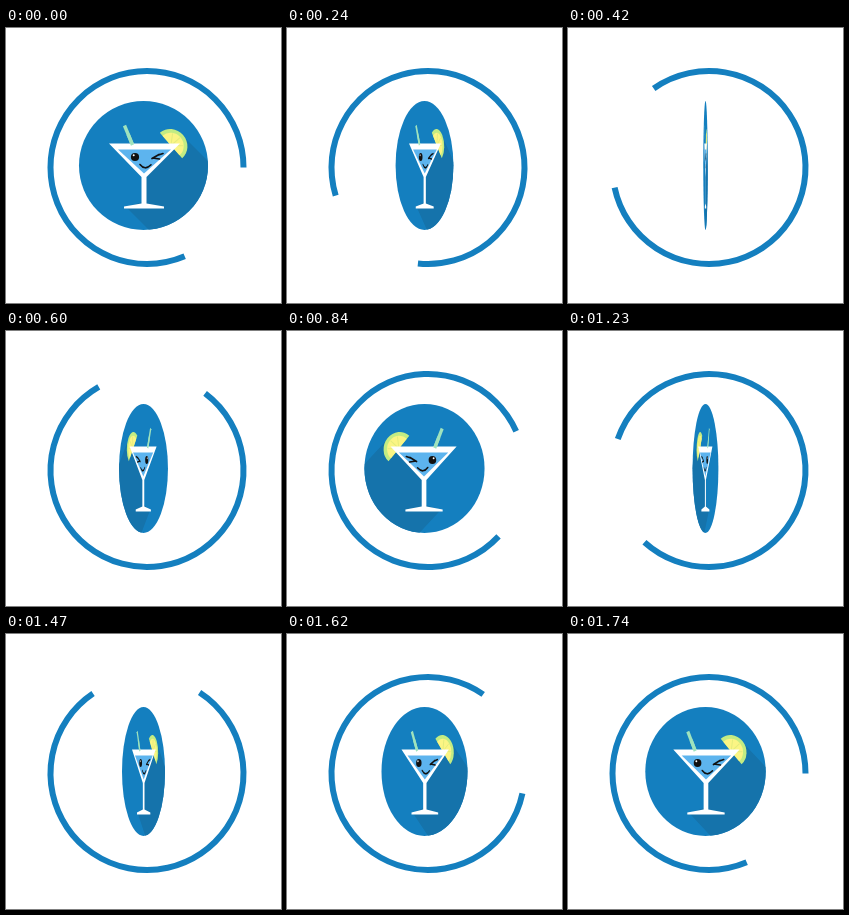
Write an HTML page that moves like this. It is 275 px wide and 275 px high and loops after 1.77 s.

```html
<!DOCTYPE html>
<html lang="en">
<head>
<meta charset="utf-8">
<title>Cocktail loader</title>
<style>
html, body { margin: 0; width: 100%; height: 100%; overflow: hidden; background: #fff; }
svg { display: block; width: 100vw; height: 100vh; }
</style>
</head>
<body>
<svg viewBox="0 0 275 275">
  <clipPath id="round"><circle cx="137.5" cy="137.5" r="64.5"/></clipPath>
  <!-- Arc runs from the end of the gap (67deg) round to 0deg -->
  <circle id="ring" cx="141" cy="139.5" r="96.5" fill="none" stroke="#147fbf" stroke-width="6"
    pathLength="360" stroke-dasharray="0 67 293 0"/>
  <g id="badge">
    <circle cx="137.5" cy="137.5" r="64.5" fill="#147fbf"/>
    <path clip-path="url(#round)" fill="#1573ab" d="M180 111L260 191 200 259 120 179 136 174 138 148 172 118Z"/>
    <path d="M118.5 97.5L127 118" stroke="#9fe3bd" stroke-width="3.4"/>
    <g transform="translate(165 117.5) rotate(49)">
      <path d="M-17 0A17 16 0 0 1 17 0Z" fill="#c3ec83"/>
      <path d="M-13 0A13 12.5 0 0 1 13 0Z" fill="#fbf584"/>
      <path d="M0 0L-8 -9M0 0V-12M0 0L8 -9" stroke="#e4ec7c"/>
    </g>
    <path fill="#fff" d="M103 115.5H174L140.5 149V175.5L158 178.5V180.5H118V178.5L135.5 175.5V149Z"/>
    <path fill="#5db4ee" d="M112 121.5H165L138 145.5Z"/>
    <path d="M122 106L126.5 117" stroke="#9fe3bd" stroke-width="3.4"/>
    <circle cx="129" cy="129" r="4.1" fill="#111"/>
    <circle cx="127.7" cy="127.3" r="1" fill="#fff"/>
    <path d="M146 130.5L153 126.5M146.5 130L153.5 131M151 127.5L157 125.5"
      fill="none" stroke="#111" stroke-width="1.7" stroke-linecap="round"/>
    <path d="M134 136.5Q139 143 145 136.8" fill="none" stroke="#111" stroke-width="1.6" stroke-linecap="round"/>
  </g>
</svg>
<script>
const STEP = 30, COUNT = 59, HALF = 29;
const ring = document.getElementById('ring');
const badge = document.getElementById('badge');
const turns = [[0, 0], [41, 492], [49, 596], [58, 720]];

function ringAngle(n) {
  const i = turns.findIndex(([end], k) => k && n <= end);
  const [n0, a0] = turns[i - 1], [n1, a1] = turns[i];
  return a0 + (a1 - a0) * (n - n0) / (n1 - n0);
}

// The width shrinks linearly to a mirrored badge, then returns.
function flip(n) {
  return n < HALF ? 1 - 2 * n / HALF : 2 * (n - HALF) / (COUNT - HALF) - 1;
}

function draw(time) {
  const n = Math.floor(time / STEP) % COUNT;
  ring.setAttribute('transform', `rotate(${ringAngle(n)} 141 139.5)`);
  badge.setAttribute('transform', `translate(137.5 0) scale(${flip(n)} 1) translate(-137.5 0)`);
}

let start;
function tick(now) {
  start ??= now;
  draw(now - start);
  requestAnimationFrame(tick);
}
draw(0);
requestAnimationFrame(tick);
</script>
</body>
</html>
```
